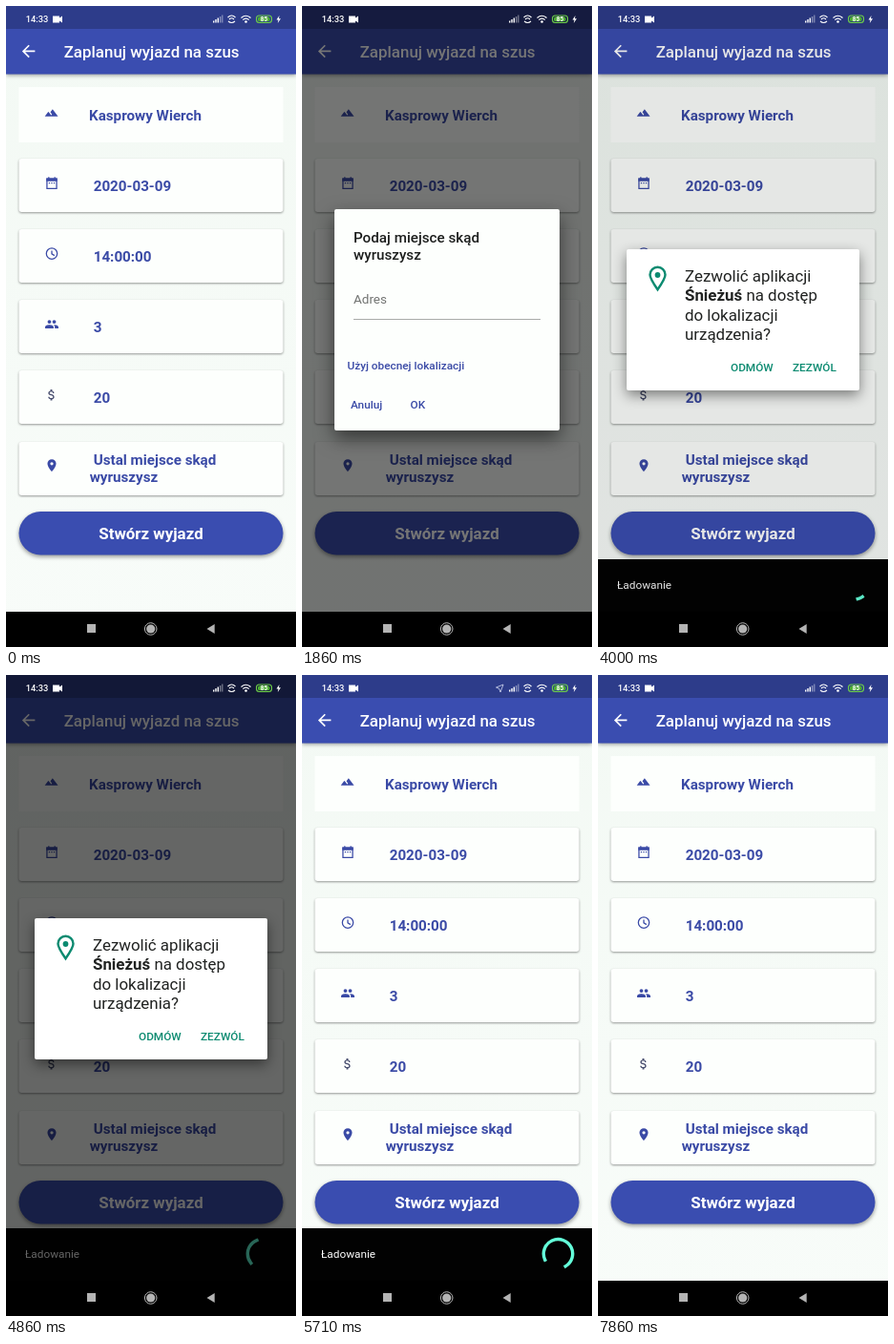
Animation, 304 px wide and 672 px high, one loop 8000 ms. Source, as an HTML page:

```html
<!DOCTYPE html>
<html lang="pl">
<head>
<meta charset="utf-8">
<title>Zaplanuj wyjazd</title>
<style>
  html, body { margin: 0; height: 100%; overflow: hidden; background: #000; }
  svg { display: block; width: 304px; height: 672px; font-family: Roboto, sans-serif; }
  text { white-space: pre; }
  .card rect { fill: #fdfffd; filter: drop-shadow(0 1px 1px #0006); }
  .card text { font-size: 15.2px; font-weight: 700; fill: #3a4aa6; }
  .card path, .card circle { fill: #3a4aa6; }
  .card .line { fill: none; stroke: #3a4aa6; stroke-width: 2; }
  .title { font-size: 16.9px; font-weight: 500; fill: #fff; }
  .small { font-size: 11.8px; }
  .action { font-size: 11.8px; font-weight: 500; }
</style>
</head>
<body>
<svg viewBox="0 0 304 672">
  <defs>
    <linearGradient id="page" x2="0" y2="1">
      <stop stop-color="#f3f9f4"/><stop offset="1" stop-color="#f8fcf9"/>
    </linearGradient>
    <clipPath id="placeCard"><rect x="13.5" y="457" width="277" height="56" rx="3"/></clipPath>
    <clipPath id="locateButton"><rect x="41" y="362" width="137" height="30"/></clipPath>
  </defs>

  <rect width="304" height="672" fill="url(#page)"/>
  <rect width="304" height="71.5" fill="#3a4db0" style="filter:drop-shadow(0 1px 2px #0006)"/>
  <rect width="304" height="24" fill="#2d3c8a"/>
  <path transform="translate(13.5 37.3) scale(.844)" fill="#fff" d="M20 11H7.83l5.59-5.59L12 4l-8 8 8 8 1.41-1.41L7.83 13H20v-2z"/>
  <text class="title" x="60.7" y="53.7">Zaplanuj wyjazd na szus</text>

  <g class="card">
    <rect x="13.5" y="85" width="277" height="58" style="filter:none"/>
    <path transform="translate(40 104.4) scale(.633)" d="M14 6l-3.75 5 2.85 3.8-1.6 1.2C9.81 13.75 7 10 7 10l-6 8h22z"/>
    <text x="87" y="119.5">Kasprowy Wierch</text>
  </g>
  <g class="card">
    <rect x="13.5" y="160" width="277" height="56" rx="3"/>
    <g transform="translate(40.4 178) scale(.633)">
      <path class="line" d="M4 5h16v16H4z"/>
      <path d="M3 4h18v5H3zM6 2h2v3H6zM16 2h2v3h-2zM7 11h2v2H7zM11 11h2v2h-2zM15 11h2v2h-2z"/>
    </g>
    <text x="91.7" y="193.5">2020-03-09</text>
  </g>
  <g class="card">
    <rect x="13.5" y="234" width="277" height="56" rx="3"/>
    <g transform="translate(40.4 252) scale(.633)">
      <circle class="line" cx="12" cy="12" r="9"/>
      <path class="line" d="M12 7v5.5l4.5 2.7"/>
    </g>
    <text x="91.7" y="267.7">14:00:00</text>
  </g>
  <g class="card">
    <rect x="13.5" y="308" width="277" height="56" rx="3"/>
    <g transform="translate(40.4 326) scale(.633)">
      <circle cx="8" cy="8" r="3"/><circle cx="16" cy="8" r="3"/>
      <path d="M8 13c-2.33 0-7 1.17-7 3.5V19h14v-2.5c0-2.33-4.67-3.5-7-3.5zM16 13l-1 .05c1.2.84 2 1.97 2 3.45V19h6v-2.5c0-2.33-4.67-3.5-7-3.5z"/>
    </g>
    <text x="91.7" y="341.7">3</text>
  </g>
  <g class="card">
    <rect x="13.5" y="382" width="277" height="56" rx="3"/>
    <path transform="translate(40.2 400.2) scale(.633)" style="fill:#4a5070" d="M11.8 10.9c-2.27-.59-3-1.2-3-2.15 0-1.09 1.01-1.85 2.7-1.85 1.78 0 2.44.85 2.5 2.1h2.21c-.07-1.72-1.12-3.3-3.21-3.81V3h-3v2.16c-1.94.42-3.5 1.68-3.5 3.61 0 2.31 1.91 3.46 4.7 4.13 2.5.6 3 1.48 3 2.41 0 .69-.49 1.79-2.7 1.79-2.06 0-2.87-.92-2.98-2.1h-2.2c.12 2.19 1.76 3.42 3.68 3.83V21h3v-2.15c1.95-.37 3.5-1.5 3.5-3.55 0-2.84-2.43-3.81-4.7-4.4z"/>
    <text x="91.7" y="415.7">20</text>
  </g>
  <g class="card">
    <rect x="13.5" y="457" width="277" height="56" rx="3"/>
    <path transform="translate(40.2 474) scale(.65)" d="M12 2C8.13 2 5 5.13 5 9c0 5.25 7 13 7 13s7-7.75 7-13c0-3.87-3.13-7-7-7zm0 9.5a2.5 2.5 0 0 1 0-5 2.5 2.5 0 0 1 0 5z"/>
    <text x="91.7" y="481">Ustal miejsce skąd</text>
    <text x="87.7" y="499">wyruszysz</text>
  </g>
  <g clip-path="url(#placeCard)"><circle id="cardRipple" cx="177" cy="470"/></g>

  <rect x="13.5" y="530" width="277" height="45.5" rx="22.7" fill="#3a4db0" style="filter:drop-shadow(0 2px 2px #0006)"/>
  <text class="title" x="152" y="559" text-anchor="middle" style="font-weight:700">Stwórz wyjazd</text>

  <g id="snackbar">
    <rect y="580" width="304" height="56" fill="#020202"/>
    <text class="small" x="20" y="611.3" fill="#fff">Ładowanie</text>
    <circle id="spinner" cx="268.5" cy="606.8" r="15.2" pathLength="360" fill="none" stroke="#64ffda" stroke-width="3.4" stroke-linecap="square"/>
  </g>

  <rect id="dim" width="304" height="636"/>

  <g id="addressDialog">
    <rect x="34" y="213" width="236" height="232" rx="2" fill="#fdfffd" style="filter:drop-shadow(0 8px 10px #0008)"/>
    <g font-size="15.2" font-weight="500" fill="#1d1f1e">
      <text x="54" y="248.3">Podaj miejsce skąd</text>
      <text x="54" y="266.3">wyruszysz</text>
    </g>
    <text x="54" y="312.3" font-size="13.5" fill="#737573">Adres</text>
    <path d="M54 328.5h196" stroke="#a9aba9"/>
    <g clip-path="url(#locateButton)"><circle id="buttonRipple" cx="131" cy="385" fill="#3a4db0" fill-opacity=".16"/></g>
    <g class="action" fill="#3a4aa6">
      <text x="47.5" y="381">Użyj obecnej lokalizacji</text>
      <text x="51" y="422.2">Anuluj</text>
      <text x="113.5" y="422.2">OK</text>
    </g>
  </g>

  <g id="permission">
    <rect x="30" y="255" width="244" height="148" rx="2" fill="#fff" style="filter:drop-shadow(0 5px 7px #0007)"/>
    <g transform="translate(62.5 286)" fill="none" stroke="#0b8a70" stroke-width="2.4">
      <path d="M0 11.3C-3 7-8-.5-8-4.2a8 8 0 0 1 16 0C8-.5 3 7 0 11.3z"/>
      <circle cy="-4" r="2.9" fill="#0b8a70" stroke="none"/>
    </g>
    <g font-size="16.9" fill="#202221">
      <text x="91" y="289">Zezwolić aplikacji</text>
      <text x="91" y="309.3"><tspan font-weight="700">Śnieżuś</tspan> na dostęp</text>
      <text x="91" y="329.6">do lokalizacji</text>
      <text x="91" y="349.9">urządzenia?</text>
    </g>
    <g class="action" fill="#0b8a70">
      <text x="139" y="383.3">ODMÓW</text>
      <text x="204" y="383.3">ZEZWÓL</text>
    </g>
  </g>

  <g fill="#fff">
    <text x="20.7" y="17.3" font-size="9.3" font-weight="500">14:33</text>
    <path d="M49 10.5h7v2l3-2v7l-3-2v2h-7z"/>
    <path id="gps" d="M211 10l-3 8-1.3-3.7L203.5 13z" fill="none" stroke="#c5cbe8" stroke-width=".9"/>
    <path d="M217 15.5h1.4v2h-1.4zM219.3 14h1.4v3.5h-1.4zM221.6 12.5h1.4v5h-1.4z"/>
    <path d="M223.9 11h1.4v6.5h-1.4zM226.2 9.5h1.2v8h-1.2z" opacity=".45"/>
    <g fill="none" stroke="#fff" stroke-width="1.1">
      <path d="M232.5 12q4-4 8 0M234 14q2.5-2.5 5 0M233 16q3.5 3 7 0"/>
      <path d="M246.5 12.5q5-4.5 10 0M248.3 14.5q3.2-2.8 6.4 0"/>
      <rect x="262.5" y="10" width="16" height="7.5" rx="3" stroke="#6fd04a"/>
    </g>
    <circle cx="251.5" cy="16.5" r="1.3"/>
    <rect x="264" y="11.3" width="12.5" height="5" rx="2" fill="#4fae35"/>
    <text x="270.4" y="16.3" font-size="6.3" font-weight="700" text-anchor="middle">85</text>
    <path d="M286.5 10l-3 4.5h2l-.7 3.5 3.2-4.8h-2z"/>
  </g>

  <rect y="635" width="304" height="37"/>
  <g fill="#b4b4b4">
    <rect x="85" y="648" width="9" height="9"/>
    <circle cx="151.7" cy="653" r="4.6"/>
    <circle cx="151.7" cy="653" r="6.3" fill="none" stroke="#b4b4b4"/>
    <path d="M218.7 648v10l-8.2-5z"/>
  </g>
</svg>

<script>
const LOOP = 8000;
const el = id => document.getElementById(id);
const set = (id, attrs) => Object.entries(attrs).forEach(([name, value]) => el(id).setAttribute(name, value));
const ramp = (t, from, to) => Math.min(1, Math.max(0, (t - from) / (to - from)));
const pulse = (t, inStart, inEnd, outStart, outEnd) => ramp(t, inStart, inEnd) - ramp(t, outStart, outEnd);

// cubic-bezier(.4, 0, .2, 1)
function fastOutSlowIn(x) {
  let low = 0, high = 1;
  for (let i = 0; i < 18; i++) {
    const s = (low + high) / 2, r = 1 - s;
    if (1.2 * r * r * s + 0.6 * r * s * s + s ** 3 < x) low = s; else high = s;
  }
  return 3 * (1 - low) * low * low + low ** 3;
}

function drawSpinner(t) {
  const seconds = Math.max(0, t - 3165) / 1000;
  const turn = Math.floor(seconds), phase = seconds - turn;
  const head = fastOutSlowIn(ramp(phase, 0, 0.5));
  const tail = fastOutSlowIn(ramp(phase, 0.5, 1));
  const start = -90 + tail * 270 + phase * 306 - turn * 144;
  set('spinner', {
    'stroke-dasharray': `${Math.max(0.1, (head - tail) * 270)} 400`,
    transform: `rotate(${start} 268.5 606.8)`
  });
}

function draw(t) {
  const address = pulse(t, 1200, 1343, 3430, 3580);
  const permission = pulse(t, 3850, 3980, 5240, 5400);
  const permissionDim = pulse(t, 3960, 4220, 5240, 5480);
  const snackbar = fastOutSlowIn(ramp(t, 3400, 3650)) - fastOutSlowIn(ramp(t, 7420, 7670));

  set('cardRipple', {
    r: 48 * ramp(t, 570, 1290) + 150 * ramp(t, 1290, 1600),
    opacity: 0.1 * pulse(t, 570, 700, 1290, 1600)
  });
  set('buttonRipple', { r: 8 * ramp(t, 3200, 3290) + 60 * ramp(t, 3290, 3560) });
  set('addressDialog', { opacity: address });
  set('permission', { opacity: permission });
  set('dim', { opacity: Math.max(0.54 * address, 0.6 * permissionDim) });
  set('snackbar', { transform: `translate(0 ${56 * (1 - snackbar)})` });
  set('gps', { opacity: +(t >= 5430 && t < 7400) });
  drawSpinner(t);
}

function tick() {
  draw(performance.now() % LOOP);
  requestAnimationFrame(tick);
}
tick();
</script>
</body>
</html>
```
